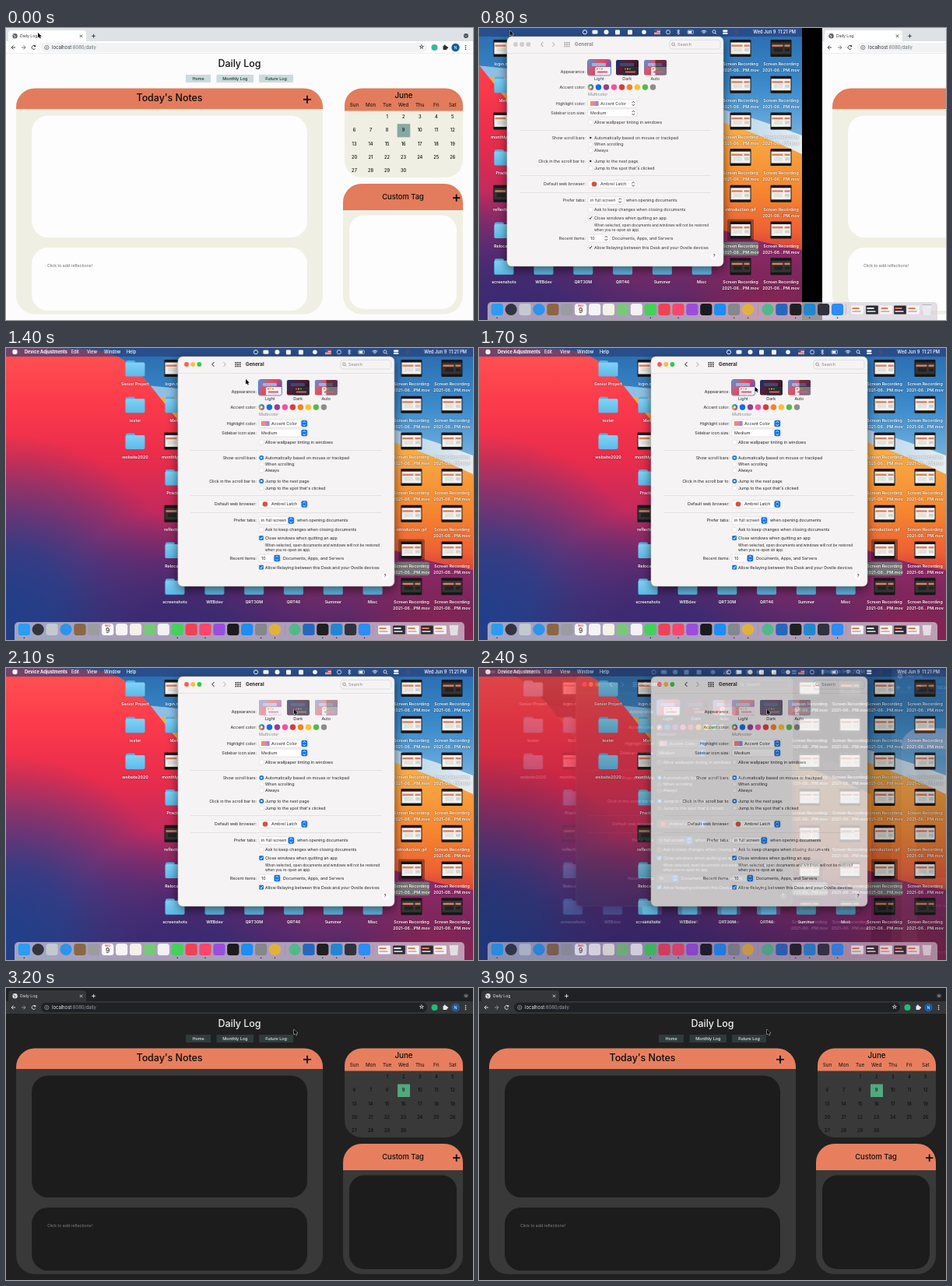
An HTML page with a canvas for the animation above (4.7 s loop, 600x375 px).

```html
<!DOCTYPE html>
<html lang="en">
<head>
<meta charset="utf-8">
<title>Light and dark daily log</title>
<style>
  html, body { margin: 0; width: 100%; height: 100%; overflow: hidden; background: #000; }
  canvas { display: block; width: 600px; height: 375px; }
</style>
</head>
<body>
<canvas id="stage" width="600" height="375"></canvas>
<script>
const W = 600, H = 375, LOOP = 4700, STEP = 100;
const SPAN = W + 26; // one screen plus the black gap between spaces
const stage = document.getElementById('stage').getContext('2d');
let c = stage;

// ---------- drawing helpers ----------
function layer(paint) {
  const canvas = document.createElement('canvas');
  canvas.width = W;
  canvas.height = H;
  c = canvas.getContext('2d');
  paint();
  c = stage;
  return canvas;
}
function rect(x, y, w, h, color, r = 0) {
  c.fillStyle = color;
  c.beginPath();
  c.roundRect(x, y, w, h, r);
  c.fill();
}
function frame(x, y, w, h, color, r = 0, width = .6) {
  c.strokeStyle = color;
  c.lineWidth = width;
  c.beginPath();
  c.roundRect(x, y, w, h, r);
  c.stroke();
}
function dot(x, y, r, color) {
  c.fillStyle = color;
  c.beginPath();
  c.arc(x, y, r, 0, 7);
  c.fill();
}
function ring(x, y, r, color, width = .8, from = 0, to = 7) {
  c.strokeStyle = color;
  c.lineWidth = width;
  c.beginPath();
  c.arc(x, y, r, from, to);
  c.stroke();
}
function line(color, width, ...pts) {
  c.strokeStyle = color;
  c.lineWidth = width;
  c.beginPath();
  for (let i = 0; i < pts.length; i += 2) c.lineTo(pts[i], pts[i + 1]);
  c.stroke();
}
function text(s, x, y, size, color, align = 'left', weight = 400) {
  c.font = `${weight} ${size}px Inter, sans-serif`;
  c.textAlign = align;
  c.textBaseline = 'middle';
  c.fillStyle = color;
  c.fillText(s, x, y);
  return c.measureText(s).width;
}
function gradient(x0, y0, x1, y1, ...colors) {
  const g = c.createLinearGradient(x0, y0, x1, y1);
  colors.forEach((color, i) => g.addColorStop(i / (colors.length - 1), color));
  return g;
}
function glow(x, y, r, color) {
  const g = c.createRadialGradient(x, y, 0, x, y, r);
  g.addColorStop(0, color);
  g.addColorStop(.35, color + 'd0');
  g.addColorStop(1, color + '00');
  rect(0, 0, W, H, g);
}
function plus(x, y, r, color, width) {
  line(color, width, x - r, y, x + r, y);
  line(color, width, x, y - r, x, y + r);
}

// ---------- browser ----------
function browser(dark) {
  const ink = dark ? '#e8eaed' : '#303236', soft = dark ? '#9aa0a6' : '#6b6f75';
  const bar = dark ? '#35363a' : '#fff';
  rect(0, 0, W, H, dark ? '#202020' : '#fcfcfc');
  rect(0, 0, W, 18, dark ? '#202124' : '#dee1e6');
  rect(3, 3, 100, 16, bar, [4, 4, 0, 0]);
  rect(0, 17, W, 15.5, bar);
  rect(0, 32, W, .6, dark ? '#46474a' : '#dcdee1');
  dot(11.5, 10.2, 3.2, dark ? '#dfe1e5' : '#5f6368');
  line(bar, .8, 9.5, 9, 12, 10.5, 11, 12.5);
  text('Daily Log', 18, 10.5, 5.1, ink);
  line(ink, .8, 94.8, 8.6, 98.2, 12);
  line(ink, .8, 94.8, 12, 98.2, 8.6);
  plus(112.5, 10.3, 2.4, ink, .9);
  dot(591, 10, 3, dark ? '#46484c' : '#4a4d51');
  line('#fff', .7, 589.6, 9.4, 591, 10.8, 592.4, 9.4);

  line(ink, .9, 9.5, 22.5, 7, 25, 9.5, 27.5);
  line(ink, .9, 7, 25, 12, 25);
  line(soft, .9, 22.5, 22.5, 25, 25, 22.5, 27.5);
  line(soft, .9, 20, 25, 25, 25);
  ring(35.5, 25, 2.4, ink, .9, .5, 5.6);
  rect(36.2, 22.2, 2, 2, ink);
  rect(45, 18.8, 496, 12.4, dark ? '#202124' : '#f1f3f4', 6.2);
  ring(52.3, 25, 2.6, soft, .8);
  line(soft, .8, 52.3, 23.6, 52.3, 26.5);
  const host = text('localhost', 59, 25.3, 5.9, ink);
  text(':8080/daily', 59 + host, 25.3, 5.9, soft);
  text('☆', 534, 25.2, 7.5, ink, 'center');
  dot(550.5, 25, 4, dark ? '#1fbf74' : '#35b99c');
  rect(561.5, 23, 5, 5, ink, .8);
  dot(563.7, 22.8, 1.2, ink);
  dot(566.8, 25.2, 1.2, ink);
  dot(577.5, 25, 5.2, dark ? '#1d5f9e' : '#135ea3');
  text('N', 577.5, 25.4, 5.2, '#fff', 'center');
  for (const y of [22.6, 25, 27.4]) dot(590.5, y, .8, ink);

  page(dark);
}
function page(dark) {
  const title = dark ? '#f4f4f4' : '#111', black = '#0d0d0d';
  const accent = dark ? '#e77f5f' : '#e27c5c';
  const card = dark ? '#393939' : '#f0efe3', panel = dark ? '#1c1c1c' : '#fdfdfd';
  const sheet = (x, y, w, h, head, r) => {
    rect(x, y, w, h, card, r);
    rect(x, y, w, head, accent, [r, r, 0, 0]);
  };
  text('Daily Log', 300, 46.3, 12.4, title, 'center', 500);
  [['Home', 231, 32], ['Monthly Log', 270.5, 47.5], ['Future Log', 325, 44]].forEach(([s, x, w]) => {
    rect(x, 60, w, 10, dark ? '#2f3c3b' : '#cddade');
    text(s, x + w / 2, 65.2, 5.4, dark ? '#e3efec' : '#12391f', 'center', 500);
  });

  sheet(13, 77.5, 394, 290, 26.5, 24);
  text("Today's Notes", 210, 90.6, 12.4, black, 'center', 500);
  plus(387, 91.8, 5, black, 1.8);
  rect(33, 112.5, 354, 156.5, panel, 21);
  rect(33, 282, 354, 81, panel, 21);
  text('Click to add reflections!', 53, 305, 5.2, dark ? '#858585' : '#666');

  sheet(435, 77.5, 152, 114.5, 29, 22);
  text('June', 511, 87.2, 9.8, black, 'center', 500);
  const col = i => 447.5 + 21.05 * i;
  ['Sun', 'Mon', 'Tue', 'Wed', 'Thu', 'Fri', 'Sat']
    .forEach((s, i) => text(s, col(i), 99.2, 6.3, black, 'center'));
  rect(503, 123.5, 16, 16.5, dark ? '#52a87f' : '#86aaa3');
  if (!dark) frame(503, 123.5, 16, 16.5, '#9b9b9b');
  for (let d = 1; d <= 30; d++) {
    const cell = d + 1;
    text(d, col(cell % 7), 114.5 + 17.2 * Math.floor(cell / 7), 5.7, black, 'center', 500);
  }

  sheet(433, 200, 154, 167.5, 34, 24);
  text('Custom Tag', 510, 217.3, 9.4, black, 'center', 500);
  plus(578.7, 218.2, 4.6, black, 1.8);
  rect(441, 240.5, 138, 120.5, panel, 19);
}

// ---------- desktop ----------
function wave(fill, x, y, ...curves) {
  c.fillStyle = fill;
  c.beginPath();
  c.moveTo(x, y);
  for (let i = 0; i < curves.length; i += 6) c.bezierCurveTo(...curves.slice(i, i + 6));
  c.lineTo(W, H);
  c.lineTo(0, H);
  c.fill();
}
function wallpaper(dark) {
  rect(0, 0, W, H, dark ? '#0b0b12' : gradient(0, 0, 0, 150, '#2a6cae', '#3c8bcb', '#7db7e2'));
  wave(dark ? '#2a2028' : gradient(440, 0, W, 0, '#8fc0e4', '#e8edf1'), 0, 40,
    200, 40, 420, 70, W, 138);
  wave(gradient(0, 130, 0, 290, '#f9ad45', '#f5862f', '#ea4b38'), 0, 60,
    200, 50, 430, 80, W, 162);
  wave(gradient(0, 0, 0, 360, '#ff5352', '#fb3a4b', '#e92c4c', '#bf2a5e', '#8a2a6c', '#4f2a66'), 0, 0,
    60, 0, 100, 0, 125, 4,
    190, 20, 200, 100, 300, 160,
    400, 220, 480, 265, W, 285);
  glow(0, 340, 230, '#20408a');
  glow(230, 375, 170, '#3a2a72');
  glow(560, 390, 130, '#8c2350');
  if (dark) rect(0, 0, W, H, '#0a050e88');
}
function label(s, x, y) {
  c.shadowColor = '#0009';
  c.shadowBlur = 2;
  text(s, x, y, 5.3, '#fff', 'center', 600);
  c.shadowBlur = 0;
}
function folder(x, y, s) {
  rect(x - 12, y - 10, 12, 8, '#4fb4e3', 2);
  rect(x - 12.5, y - 7.5, 25, 18, gradient(0, y - 8, 0, y + 10, '#84d3f6', '#5cbbe9'), 1.8);
  label(s, x, y + 20.5);
}
function clip(x, y, night) {
  rect(x - 13.5, y - 11, 27, 22, '#161616', 1);
  rect(x - 12.5, y - 7.5, 25, 15, night ? '#343434' : '#f3f1ee');
  rect(x - 11.5, y - 4.5, 14, 2.4, '#e27c5c');
  rect(x + 4.5, y - 4.5, 7, 2.4, '#e27c5c');
  rect(x - 9, y - .5, 11, 5, night ? '#222' : '#dfe4dd');
  rect(x + 5, y, 6, 4, night ? '#222' : '#cbd6d4');
}
function icons() {
  const row = i => 26 + 46.7 * i;
  ['Senior Project', 'tester', 'website2020'].forEach((s, i) => folder(166, row(i), s));
  ['login.mov', 'Math', 'monthly.mov', 'Practice', 'reflections', 'Relocated', 'screenshots'].forEach((s, i) => {
    if (i % 2 || i === 6) folder(217, row(i), s);
    else { clip(217, row(i), i === 4); label(s, 217, row(i) + 20.5); }
  });
  ['WEBdev', 'QRT30M', 'QRT46', 'Summer', 'Misc'].forEach((s, i) => folder(268 + 50.8 * i, row(6), s));
  [521, 573].forEach((x, k) => {
    for (let i = 0; i < 7; i++) {
      const y = row(i), picked = k === 0 && i === 5;
      if (picked) {
        rect(x - 17, y - 14, 34, 28, '#0005', 2);
        rect(x - 23, y + 15.5, 46, 17, '#777', 2);
      }
      clip(x, y, i === 6 || (k && i === 0));
      if (k === 0 && i === 4) { label('introduction.gif', x, y + 20.5); continue; }
      label('Screen Recording', x, y + 20.5);
      label('2021-06...PM.mov', x, y + 28.5);
    }
  });
}
function menuBar(dark) {
  const ink = '#fff';
  rect(0, 0, W, 11, dark ? '#1c1c2699' : '#2a3d78a8');
  dot(11.5, 5, 3.2, ink);
  text('Device Adjustments', 24, 5.6, 5.6, ink, 'left', 700);
  [['Edit', 84], ['View', 104], ['Window', 126], ['Help', 155]].forEach(([s, x]) => text(s, x, 5.6, 5.5, ink, 'left', 500));
  ring(321, 5.3, 2.6, ink, 1);
  rect(330.5, 2.8, 7, 5, ink, 1.3);
  dot(348.5, 5.3, 3, ink);
  rect(360, 2.4, 6, 6, ink, 1);
  rect(376, 2.4, 6, 6, ink, 1);
  dot(397, 5.3, 2.8, ink);
  rect(410, 2.8, 8, 5.4, '#fff');
  for (const y of [3, 4.8, 6.6]) rect(410, y, 8, .9, '#d23b43');
  rect(410, 2.8, 3.5, 2.6, '#3551a0');
  ring(428, 5.3, 2.6, ink);
  line(ink, .8, 439.5, 3.4, 442.8, 6.8, 441, 8.6, 441, 2, 442.8, 3.7, 439.5, 7);
  frame(453, 3, 7.5, 4.6, ink, 1);
  rect(453.8, 3.8, 4.6, 3, ink);
  for (const r of [1.5, 3.2, 4.8]) ring(474, 8, r, ink, .9, 3.95, 5.47);
  ring(487, 4.8, 2, ink);
  line(ink, .9, 488.5, 6.3, 490, 8);
  rect(498, 2.5, 6.5, 2.4, ink, 1.2);
  rect(498, 5.7, 6.5, 2.4, ink, 1.2);
  dot(516, 5.3, 3, '#454b77');
  text('Wed Jun 9  11:21 PM', 592, 5.6, 5.7, ink, 'right', 500);
}

function settings({ dark, active, pressed }) {
  const ink = dark ? '#ececec' : active ? '#222' : '#333', soft = dark ? '#a5a5a5' : '#858585';
  const body = dark ? '#2d2b2c' : '#f5f3f3', field = dark ? '#4b4a4b' : '#fff';
  const edge = dark ? '#5b5b5b' : '#d2d0d0', blue = active ? '#1673e6' : field;
  const mark = active ? '#fff' : '#222', S = 5.35;
  const say = (s, x, y, size = S) => text(s, x, y + .3, size, ink);
  const name = (s, y) => text(s, 322, y + .3, S, ink, 'right');

  c.shadowColor = '#0009';
  c.shadowBlur = 14;
  c.shadowOffsetY = 4;
  rect(221, 11, 278, 295, body, 6);
  c.shadowColor = 'transparent';
  c.shadowBlur = c.shadowOffsetY = 0;
  frame(221, 11, 278, 295, dark ? '#666' : '#c9c6c6', 6, .5);
  rect(221, 32, 278, .6, edge);
  ['#fc5b57', '#fdbc40', '#34c84a'].forEach((color, i) => dot(232 + 8.2 * i, 21, 2.9, active ? color : '#cfcdcd'));
  const tool = active ? ink : '#999';
  line(tool, 1, 267.5, 18, 264.7, 21, 267.5, 24);
  line('#aaa', 1, 279.5, 18, 282.3, 21, 279.5, 24);
  for (let i = 0; i < 9; i++) rect(294.5 + 2.7 * (i % 3), 18 + 2.4 * Math.floor(i / 3), 1.7, 1.5, tool);
  text('General', 308, 21.4, 6.2, active ? ink : '#888', 'left', 700);
  frame(430, 15.5, 65, 11.5, edge, 3);
  ring(434.5, 20.8, 1.8, soft);
  line(soft, .8, 435.8, 22.1, 437.2, 23.5);
  text('Search', 440, 21.5, 5.4, soft);

  name('Appearance:', 56);
  ['Light', 'Dark', 'Auto'].forEach((s, i) => {
    const x = 325 + 36 * i, night = i === 1;
    if (i === 0 && !pressed) frame(x - .4, 40.6, 29.8, 20.3, '#2979e8', 2.5, 1);
    rect(x, 41, 29, 19.5, night ? gradient(x, 41, x + 20, 60, '#17356b', '#571c35', '#25152c')
      : gradient(x, 41, x + 22, 60, '#4f94e0', '#ec4b57', '#6c4bb2'), 2);
    rect(x + 9, 50, 20, 10.5, night ? '#2b2b30' : '#f2eff2', [2, 0, 2, 0]);
    rect(x + 5, 45, 18, 4, night ? '#3b4a70' : '#8bb8ee', 1);
    if (i === 2) rect(x + 14.5, 41, 14.5, 19.5, '#20111f90', [0, 2, 2, 0]);
    ['#fc5b57', '#fdbc40', '#34c84a'].forEach((color, k) => dot(x + 12 + 3 * k, 52.5, 1, color));
    rect(x + 12, 55.5, 13, 2, '#e3566c');
    if (pressed) rect(x, 41, 29, 19.5, night ? '#8f98b080' : '#f5f3f37a', 2);
    text(s, x + 14.3, 65.4, S, ink, 'center');
  });

  name('Accent color:', 76);
  ['#6b63d6', '#0b6fe8', '#953d96', '#f74f9e', '#e0383e', '#f7821b', '#fdc02f', '#56bb45', '#8c8c8c']
    .forEach((color, i) => dot(328.5 + 10 * i, 76, 3.7, color));
  ['#ea4a55', '#f5a032', '#5bbb4d', '#2a7fe6'].forEach((color, i) =>
    ring(328.5, 76, 2.6, color, 2.2, i * 1.571, i * 1.571 + 1.571));
  dot(328.5, 76, 1.4, '#fff');
  text('Multicolor', 325, 85.6, S, soft);

  const select = (s, y, w, pad = 3) => {
    rect(325, y - 5, w, 10, field, 2);
    frame(325, y - 5, w, 10, edge, 2, .5);
    say(s, 325 + pad, y);
    const x = 325 + w - 8.6;
    rect(x, y - 4.2, 7.8, 8.4, blue, 2);
    line(mark, .8, x + 2.2, y - 1, x + 3.9, y - 2.8, x + 5.6, y - 1);
    line(mark, .8, x + 2.2, y + 1, x + 3.9, y + 2.8, x + 5.6, y + 1);
  };
  name('Highlight color:', 97);
  select('Accent Color', 97, 63, 16);
  rect(328, 93.8, 10.5, 6.2, gradient(328, 0, 338, 0, '#f08a62', '#e887a5', '#8f7fd8'));
  name('Sidebar icon size:', 109);
  select('Medium', 109, 63);
  name('Default web browser:', 200.5);
  select('Ambrel Latch', 200.5, 63, 16);
  dot(333, 200.5, 3.3, '#d9503f');
  name('Prefer tabs:', 221.5);
  select('in full screen', 221.5, 46);
  say('when opening documents', 374, 221.5);
  name('Recent items:', 270);
  select('10', 270, 28);
  say('Documents, Apps, and Servers', 356, 270);

  const check = (s, y, on) => {
    rect(325.2, y - 2.9, 5.8, 5.8, on ? blue : field, 1.3);
    if (!on || !active) frame(325.2, y - 2.9, 5.8, 5.8, edge, 1.3, .5);
    if (on) line(mark, 1, 326.6, y + .1, 327.8, y + 1.5, 329.8, y - 1.6);
    say(s, 333, y);
  };
  const radio = (s, y, on) => {
    dot(328.3, y, 3, on ? blue : field);
    if (!on || !active) ring(328.3, y, 3, edge, .5);
    if (on) dot(328.3, y, 1.2, mark);
    say(s, 333, y);
  };
  check('Allow wallpaper tinting in windows', 121);
  name('Show scroll bars:', 141);
  radio('Automatically based on mouse or trackpad', 141, true);
  radio('When scrolling', 149.5);
  radio('Always', 157.5);
  name('Click in the scroll bar to:', 171);
  radio('Jump to the next page', 171, true);
  radio("Jump to the spot that's clicked", 180);
  check('Ask to keep changes when closing documents', 233.5);
  check('Close windows when quitting an app', 244, true);
  say('When selected, open documents and windows will not be restored', 333, 253.3, 4.7);
  say('when you re-open an app.', 333, 259.7, 4.7);
  check('Allow Relaying between this Desk and your Ovelle devices', 281.7, true);
  for (const y of [131, 189, 211]) rect(237, y, 246, .5, edge);
  dot(487, 293.3, 4.2, field);
  text('?', 487, 293.7, 6, ink, 'center', 500);
}
function desktop(state) {
  wallpaper(state.dark);
  icons();
  menuBar(state.dark);
  settings(state);
}

function dock(dark) {
  rect(11, 352, 578, 30, dark ? '#777481c0' : '#d6cfdcb4', 5);
  const round = [1, 3, 18, 19];
  ['#2b9cf2', '#33343f', '#c4c9d1', '#2c94ea', '#8b6745', '#9b9ba0', '#fafafa', '#f5f5f5', '#f4f1e6', '#7ac77b',
    '#f2f2f2', '#43d15a', '#ef4257', '#f8476a', '#9b4ddb', '#1b1b1d', '#1c8df3', '#85878c', '#e2b13c',
    '#4fb98a', '#2767bd', '#1f2022', '#2386d1', '#30323c', '#2d8cf5'].forEach((color, i) => {
    const x = i < 19 ? 23.3 + 17.9 * i : 371 + 17.9 * (i - 19);
    if (round.includes(i)) dot(x, 361.5, 7.6, color);
    else rect(x - 7.6, 353.9, 15.2, 15.2, color, 3.5);
    if ([0, 11, 13, 17, 18, 21, 22, 24].includes(i)) dot(x, 372.3, .8, '#222');
  });
  text('WED', 130.7, 357.2, 3.2, '#e23c39', 'center', 600);
  text('9', 130.7, 363.7, 8.5, '#222', 'center');
  for (const x of [358, 471]) rect(x, 355, .6, 14, '#8887');
  [486, 505, 523, 541, 558].forEach((x, i) => {
    rect(x - 7.8, 356.5, 15.6, 11, i === 1 || i === 3 ? '#292b30' : '#f6f5f2', .8);
    rect(x - 6.5, 359, 9, 2, i === 1 ? '#eee' : '#e27c5c');
    rect(x - 6.5, 363, 11, 2, '#b9bfc1');
  });
  c.fillStyle = '#edeef0cc';
  c.beginPath();
  c.moveTo(569.5, 355);
  c.lineTo(581.5, 355);
  c.lineTo(580, 369);
  c.lineTo(571, 369);
  c.fill();
  line('#9b9ca1', .7, 569.5, 355.5, 581.5, 355.5);
}

// ---------- motion ----------
const clamp = v => Math.max(0, Math.min(1, v));
// Critically damped spring from 0 to 1
function spring(ms) {
  const x = Math.max(0, ms) * .0139;
  return 1 - (1 + x) * Math.exp(-x);
}
const pointerPath = [[0, 41, 6], [600, 41, 6], [800, 39.5, 3], [1000, 60, 6], [1400, 308, 40], [1800, 370, 53], [LOOP, 370, 53]];
const arrow = new Path2D('M0 0V6.6L1.6 5.2L2.7 7.6L3.8 7.1L2.7 4.8H4.8Z');
function pointer(t) {
  const i = pointerPath.findIndex(p => p[0] > t);
  const [t0, x0, y0] = pointerPath[i - 1], [t1, x1, y1] = pointerPath[i];
  const k = (t - t0) / (t1 - t0);
  c.save();
  c.translate(x0 + (x1 - x0) * k, y0 + (y1 - y0) * k);
  c.lineWidth = .8;
  c.strokeStyle = '#fff';
  c.fillStyle = '#000';
  c.stroke(arrow);
  c.fill(arrow);
  c.restore();
}

const pages = [false, true].map(dark => layer(() => browser(dark)));
const docks = [false, true].map(dark => layer(() => dock(dark)));
const desks = {
  idle: layer(() => desktop({})),
  active: layer(() => desktop({ active: true })),
  pressed: layer(() => desktop({ active: true, pressed: true })),
  dark: layer(() => desktop({ active: true, dark: true }))
};

function draw(t) {
  const slide = t < 2350 ? spring(t - 623) : 1 - spring(t - 2350);
  const dark = t >= 2350, x = SPAN * slide;
  const desk = dark ? 'dark' : t < 1200 ? 'idle' : t < 2000 ? 'active' : 'pressed';
  rect(0, 0, W, H, '#000');
  c.drawImage(desks[desk], x - SPAN, 0);
  c.drawImage(pages[+dark], x, 0);
  c.drawImage(docks[+dark], 0, 26 * (1 - clamp(slide / .6)));
  if (dark) { // the light screen fades out in place
    c.globalAlpha = clamp((2720 - t) / 420);
    c.drawImage(desks.pressed, 0, 0);
    c.drawImage(docks[0], 0, 0);
    c.globalAlpha = 1;
  }
  pointer(t);
}

const start = performance.now();
function tick() {
  const t = (performance.now() - start) % LOOP;
  draw(Math.floor(t / STEP) * STEP); // the picture advances ten times a second
  requestAnimationFrame(tick);
}
tick();
</script>
</body>
</html>
```
